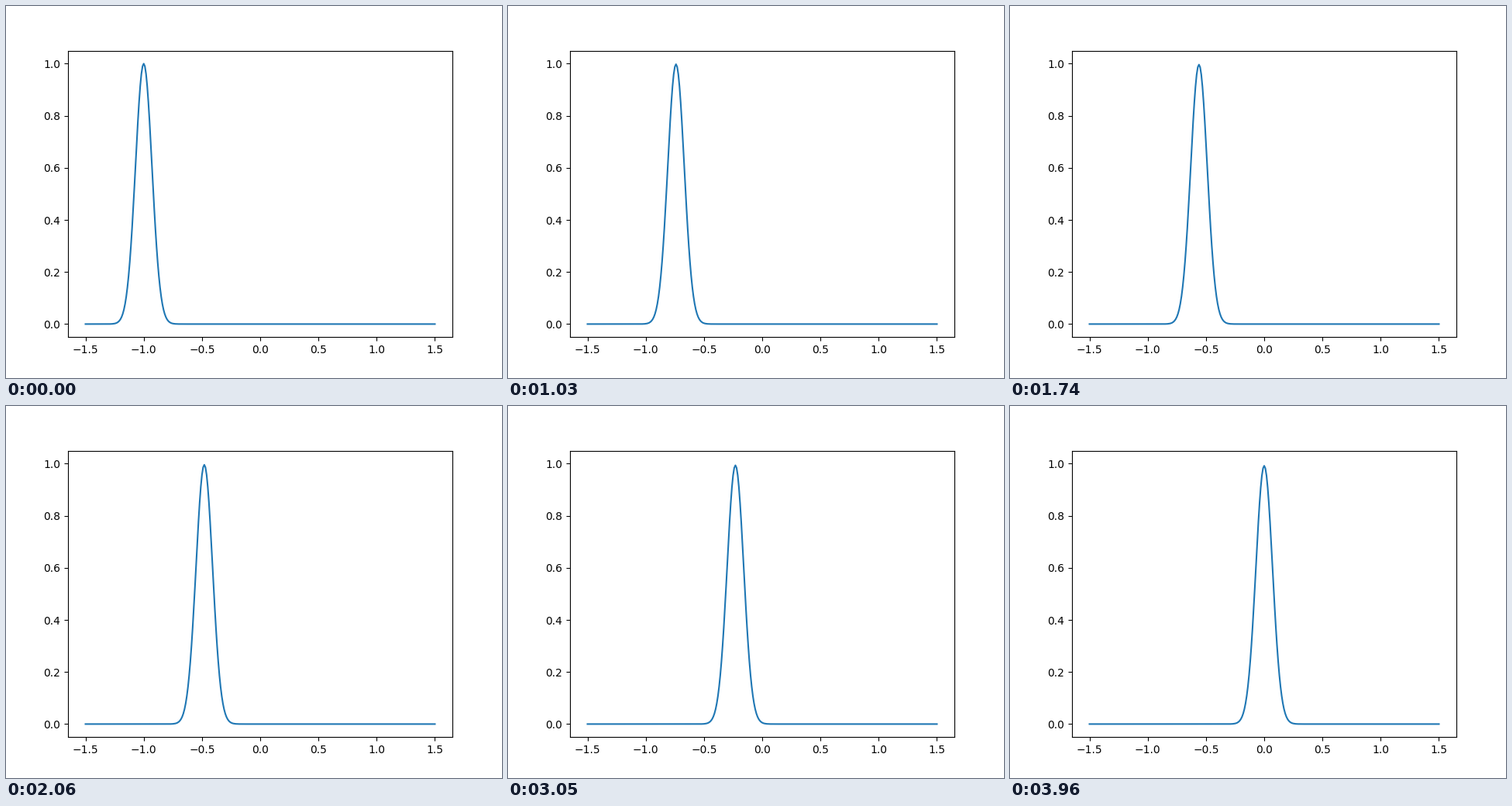
These frames come from a looping animation (640 px wide and 480 px high, 4000 ms). A matplotlib script:

```python
import numpy as np
import matplotlib.pyplot as plt
from matplotlib.animation import FuncAnimation

LOOP = 4000      # ms
INTERVAL = 20    # ms
STEPS = 101      # distinct pulse positions per loop
SPREAD = 0.0165  # growth of the squared width per unit time

x = np.linspace(-1.5, 1.5, 301)


def pulse(t):
    """Gaussian starting at x = -1, moving at unit speed and slowly diffusing."""
    s = 1 + SPREAD * t
    return np.exp(-100 * (x + 1 - t) ** 2 / s) / np.sqrt(s)


fig, ax = plt.subplots(figsize=(6.4, 4.8), dpi=100)
line, = ax.plot(x, pulse(0))


def update(k):
    # the pulse jumps in STEPS equal moves, timed to the nearest 10 ms
    step = int((INTERVAL * k + 15) * STEPS / LOOP)
    line.set_ydata(pulse(step / (STEPS - 1)))
    return line,


anim = FuncAnimation(fig, update, frames=LOOP // INTERVAL,
                     interval=INTERVAL, repeat=True, repeat_delay=0)
plt.show()
```
